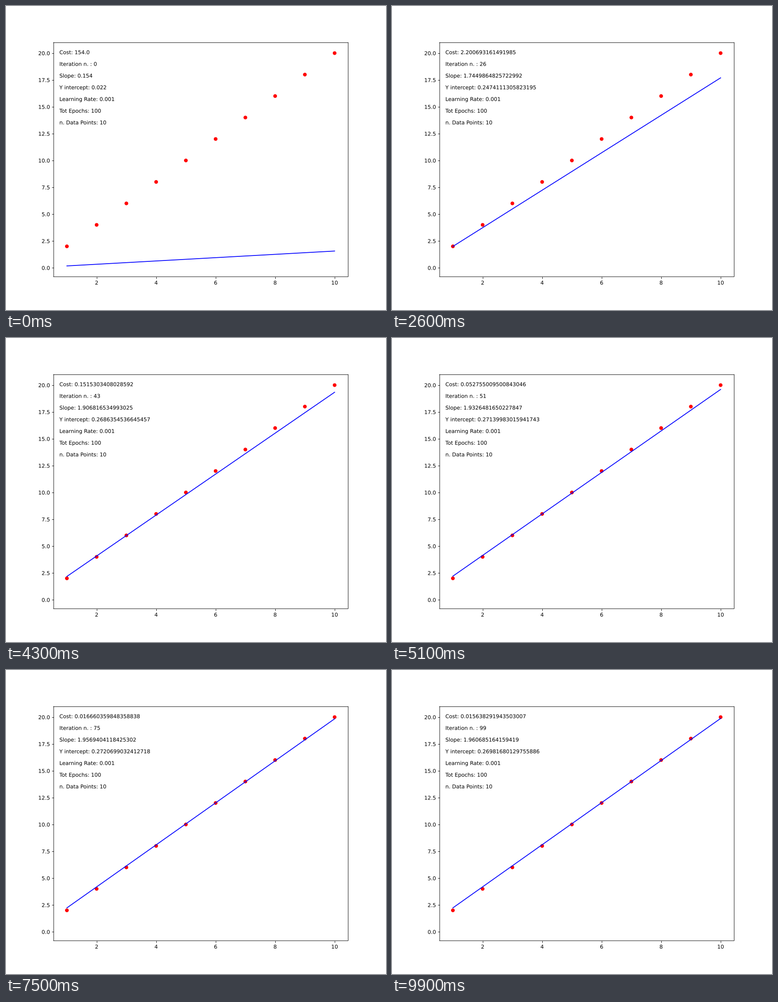
A matplotlib script that plays this animation: 837x669 px, repeating every 10000 ms.

```python
import matplotlib.pyplot as plt
import numpy as np
from matplotlib.animation import FuncAnimation
from matplotlib.patheffects import Normal

EPOCHS = 100
RATE = 0.001
DPI = 83.7

# Draw text and markers as paths, so nothing is rounded to whole pixels.
plt.rcParams.update({
    "path.snap": False,
    "path.effects": [Normal()],
    "text.hinting": "none",
})


def descend(x, y):
    """Fit y = m*x + b by gradient descent, one (cost, m, b) per epoch."""
    m = b = 0.0
    n = len(x)
    steps = []
    for _ in range(EPOCHS):
        err = y - (m * x + b)
        cost = (1 / n) * sum(e ** 2 for e in err)
        dm = -(2 / n) * sum(x * err)
        db = -(2 / n) * sum(err)
        m -= RATE * dm
        b -= RATE * db
        steps.append((cost, m, b))
    return steps


x = np.arange(1, 11)
y = 2 * x
steps = descend(x, y)

# The small surplus keeps the canvas from rounding down below 837 x 669.
fig, ax = plt.subplots(figsize=(10.0001, 7.993), dpi=DPI)

# The frame sits a fraction of a pixel right of and below the data area.
for side, sign in (("left", -1), ("right", 1), ("bottom", 1), ("top", -1)):
    ax.spines[side].set_position(("outward", sign * 0.36))

ax.plot(x, y, "ro")
_, m0, b0 = steps[0]
line, = ax.plot(x, m0 * x + b0, "b")
labels = [ax.text(0.02, 0.95 - 0.05 * i, "", transform=ax.transAxes)
          for i in range(7)]


def update(i):
    cost, m, b = steps[i]
    line.set_ydata(m * x + b)
    rows = (
        f"Cost: {cost}",
        f"Iteration n. : {i}",
        f"Slope: {m}",
        f"Y intercept: {b}",
        f"Learning Rate: {RATE}",
        f"Tot Epochs: {EPOCHS}",
        f"n. Data Points: {len(x)}",
    )
    for label, row in zip(labels, rows):
        label.set_text(row)
    return [line, *labels]


anim = FuncAnimation(fig, update, frames=EPOCHS, interval=100,
                     repeat=True, repeat_delay=0)
plt.show()
```
